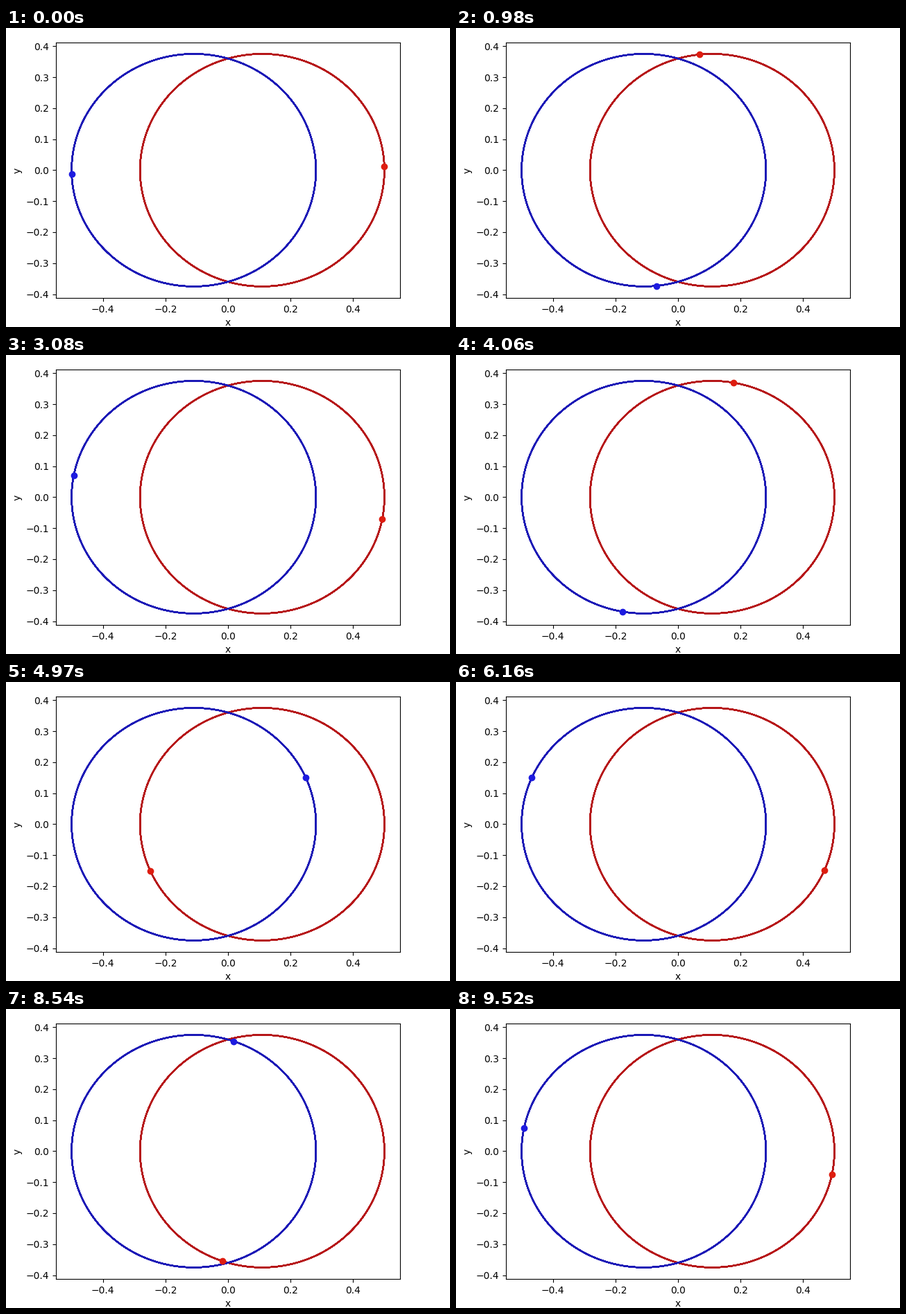
Animation of 640 by 432 pixels, one loop 9.59 s. Source, as a matplotlib script:

```python
import numpy as np
import matplotlib.pyplot as plt
from matplotlib.animation import FuncAnimation

W, H, DPI = 640, 432, 100
FRAMES, INTERVAL = 137, 70
START, STEP = 0.0205, 0.0666    # model time at the first frame and per frame

# Two unit masses, released one unit apart with speed 0.6 each
A = 1 / 2.56                    # semi-major axis
ECC = 0.28
B = A * np.sqrt(1 - ECC ** 2)
RATE = np.sqrt(2 * 1.28 ** 3)   # mean motion
TURNS = 8

RED, BLUE = "#b61618", "#1b18b6"
RED_DOT, BLUE_DOT = "#de1d10", "#1d1be0"


def orbit(phi):
    return A * (ECC + np.cos(phi)), B * np.sin(phi)


def position(t):
    """Solve Kepler's equation, with the anomaly measured from apoapsis."""
    mean = RATE * t
    phi = mean
    for _ in range(12):
        phi -= (phi + ECC * np.sin(phi) - mean) / (1 + ECC * np.cos(phi))
    return orbit(phi)


fig = plt.figure(figsize=(W / DPI, H / DPI), dpi=DPI, facecolor="white")
ax = fig.add_axes([72 / W, 41.8 / H, 496 / W, 369.6 / H])
ax.set_xlim(-0.55, 0.55)
ax.set_ylim(-0.41252, 0.41252)
ax.set_xticks(np.arange(-2, 3) * 0.2)
ax.set_yticks(np.arange(-4, 5) * 0.1)
ax.set_xlabel("x")
ax.set_ylabel("y")

# Repeated turns in one path build up the hard edge of the trail
x, y = orbit(np.linspace(0, 2 * np.pi * TURNS, 200 * TURNS + 1))
ax.plot(x, y, color=RED)
ax.plot(-x, -y, color=BLUE)
red, = ax.plot([], [], "o", color=RED_DOT, zorder=3)
blue, = ax.plot([], [], "o", color=BLUE_DOT, zorder=3)


def update(i):
    px, py = position(START + STEP * i)
    red.set_data([px], [py])
    blue.set_data([-px], [-py])
    return red, blue


anim = FuncAnimation(fig, update, frames=FRAMES, interval=INTERVAL,
                     init_func=lambda: update(0), repeat=True,
                     repeat_delay=0, blit=False)
plt.show()
```
